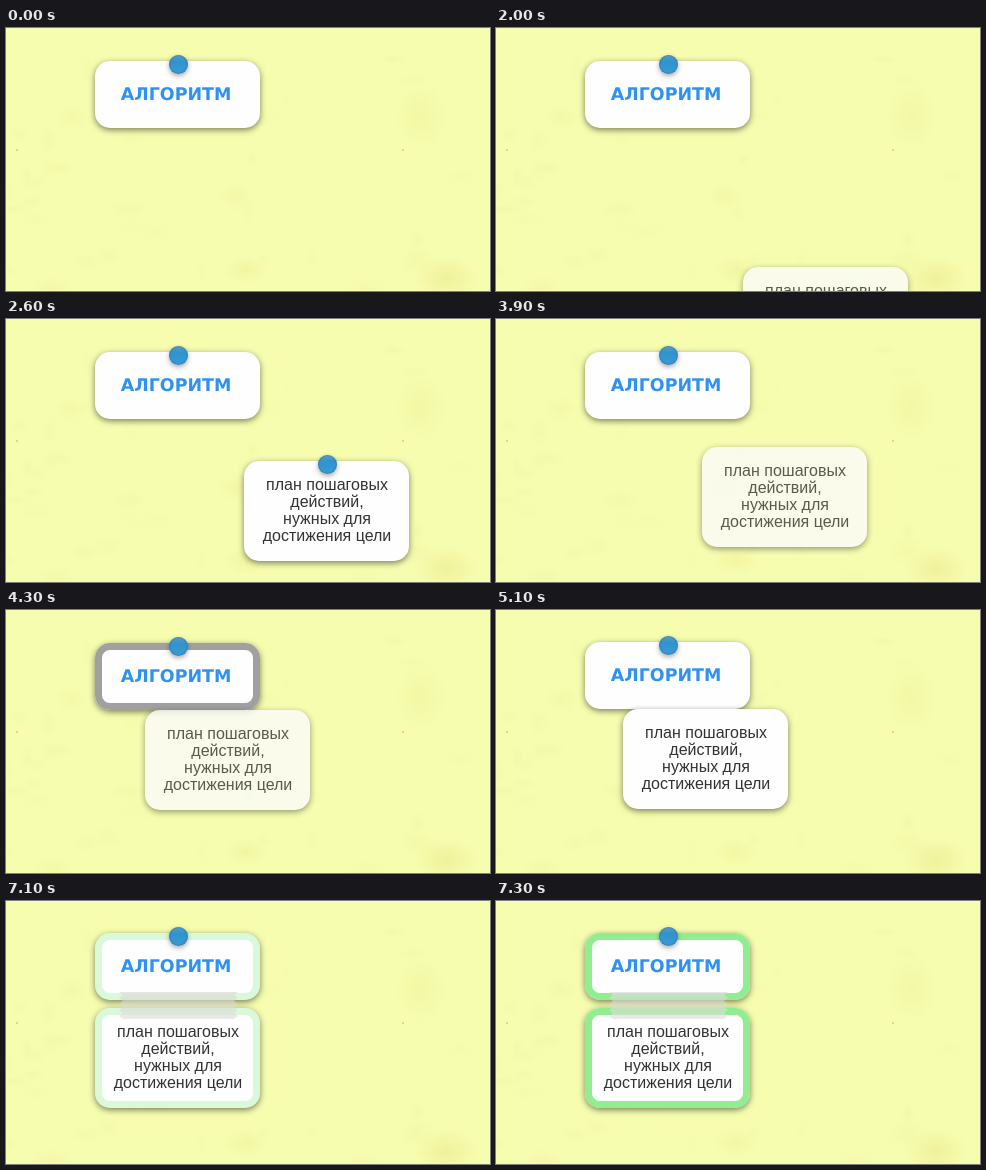
An HTML page that plays this animation: 484x263 px, repeating every 9900 ms.

```html
<!DOCTYPE html>
<html lang="ru">
<head>
<meta charset="utf-8">
<style>
  html, body { margin: 0; width: 100%; height: 100%; overflow: hidden; background: #f6fdaf; }
  svg, .card, .pin, #tape { position: absolute; left: 0; top: 0; }
  .card {
    width: 165px; box-sizing: border-box; border-radius: 15px; background: #fffeff;
    text-align: center; white-space: nowrap; --edge: transparent;
    box-shadow: inset 0 0 0 7px var(--edge), 0 2px 6px rgba(0, 0, 0, .5);
  }
  .drag { opacity: .8; background: #fbfbfa; }
  #top {
    height: 67px; padding: 24px 3px 0 0; color: #2f91f2; text-rendering: geometricPrecision;
    font: bold 17.45px/20px "DejaVu Sans", sans-serif;
  }
  #low {
    height: 100px; padding: 15px 0 0 1px; color: #333;
    font: 16px/17px "Liberation Sans", Arial, sans-serif;
  }
  .pin {
    left: 74px; top: -6px; width: 19px; height: 19px; border-radius: 50%;
    background: linear-gradient(#5a9fc4, #2f93cf 35%, #3a9bd6);
    box-shadow: inset 0 0 1px 1px rgba(50, 110, 150, .5), 0 2px 5px rgba(0, 0, 0, .35);
  }
  #tape {
    left: 113px; top: 91px; width: 119px; height: 27px;
    background: linear-gradient(rgba(222, 222, 220, .75), rgba(214, 217, 205, .6) 30%, rgba(222, 222, 220, .65));
  }
</style>
</head>
<body>
<svg width="484" height="263">
  <defs>
    <radialGradient id="blot">
      <stop offset="0" stop-color="#e9e486"/>
      <stop offset="1" stop-color="#e9e486" stop-opacity="0"/>
    </radialGradient>
  </defs>
  <g id="stains"></g>
</svg>
<div class="card" id="top">АЛГОРИТМ<i class="pin"></i></div>
<div class="card" id="low">план пошаговых<br>действий,<br>нужных для<br>достижения цели<i class="pin"></i></div>
<div id="tape"></div>
<script>
const LOOP = 9900, STEP = 100;
const [top1, low, tape] = ['top', 'low', 'tape'].map(id => document.getElementById(id));
const lowPin = low.querySelector('.pin');

// Old paper: faint random mottling, three clear stains and two specks
let seed = 7;
const rand = n => (seed = seed * 16807 % 2147483647) / 2147483647 * n;
const blot = (x, y, rx, ry, a) =>
  `<ellipse cx="${x}" cy="${y}" rx="${rx}" ry="${ry}" opacity="${a}" fill="url(#blot)"/>`;
const speck = (x, y) => `<circle cx="${x}" cy="${y}" r=".9" fill="#b5b060" opacity=".7"/>`;
let paper = blot(440, 250, 32, 22, .5) + blot(240, 242, 22, 14, .3) + blot(415, 88, 26, 34, .25);
for (let i = 0; i < 40; i++) {
  paper += blot(rand(1) ** 2 * 484, rand(263), 6 + rand(16), 5 + rand(11), .06 + rand(.12));
}
document.getElementById('stains').innerHTML = paper + speck(11, 122) + speck(397, 122);

// Saw-toothed ends of the tape
const left = [], right = [];
for (let y = 0; y <= 27; y += 3) {
  const tooth = y % 2 * 4;
  left.push(`${tooth}px ${y}px`);
  right.unshift(`${119 - tooth}px ${y}px`);
}
tape.style.clipPath = `polygon(${left.concat(right)})`;

const ramp = (t, a, b) => Math.max(0, Math.min(1, (t - a) / (b - a)));
const within = (t, a, b) => t >= a && t < b;
const swing = k => (1 - Math.cos(Math.PI * k)) / 2;
const slow = k => 1 - (1 - k) ** 2.3;
const mix = (a, b, k) => a.map((v, i) => v + (b[i] - v) * k);

// Stops of the lower card
const entry = [247, 239], pinned = [238, 142], grab = [206, 128], hold = [133, 98], home = [89, 107];

function place(t) {
  if (t < 3900) {
    const k = ramp(t, 2000, 2500), [x, y] = mix(entry, pinned, swing(k));
    return [x + 7 * Math.sin(Math.PI * k), y];
  }
  return t < 5000
    ? mix(grab, hold, slow(ramp(t, 3900, 4500)))
    : mix(hold, home, swing(ramp(t, 5000, 5400)));
}

function move(card, [x, y]) {
  card.style.left = Math.round(x) + 'px';
  card.style.top = Math.round(y) + 'px';
}

function draw(now) {
  const t = Math.floor(now % LOOP / STEP) * STEP;
  const green = `rgba(144,238,144,${ramp(t, 7000, 7300)})`;
  move(top1, [89, t < 5100 ? 33 : 32]);
  move(low, place(t));
  top1.style.setProperty('--edge', within(t, 4300, 5100) ? '#a0a0a0' : green);
  low.style.setProperty('--edge', green);
  low.hidden = t < 2000;
  low.classList.toggle('drag', within(t, 2000, 2600) || within(t, 3900, 5100));
  lowPin.hidden = !within(t, 2600, 3900);
  tape.style.opacity = ramp(t, 5200, 5500);
}

let start;
function tick(now) {
  start ??= now;
  draw(now - start);
  requestAnimationFrame(tick);
}
draw(0);
requestAnimationFrame(tick);
</script>
</body>
</html>
```
